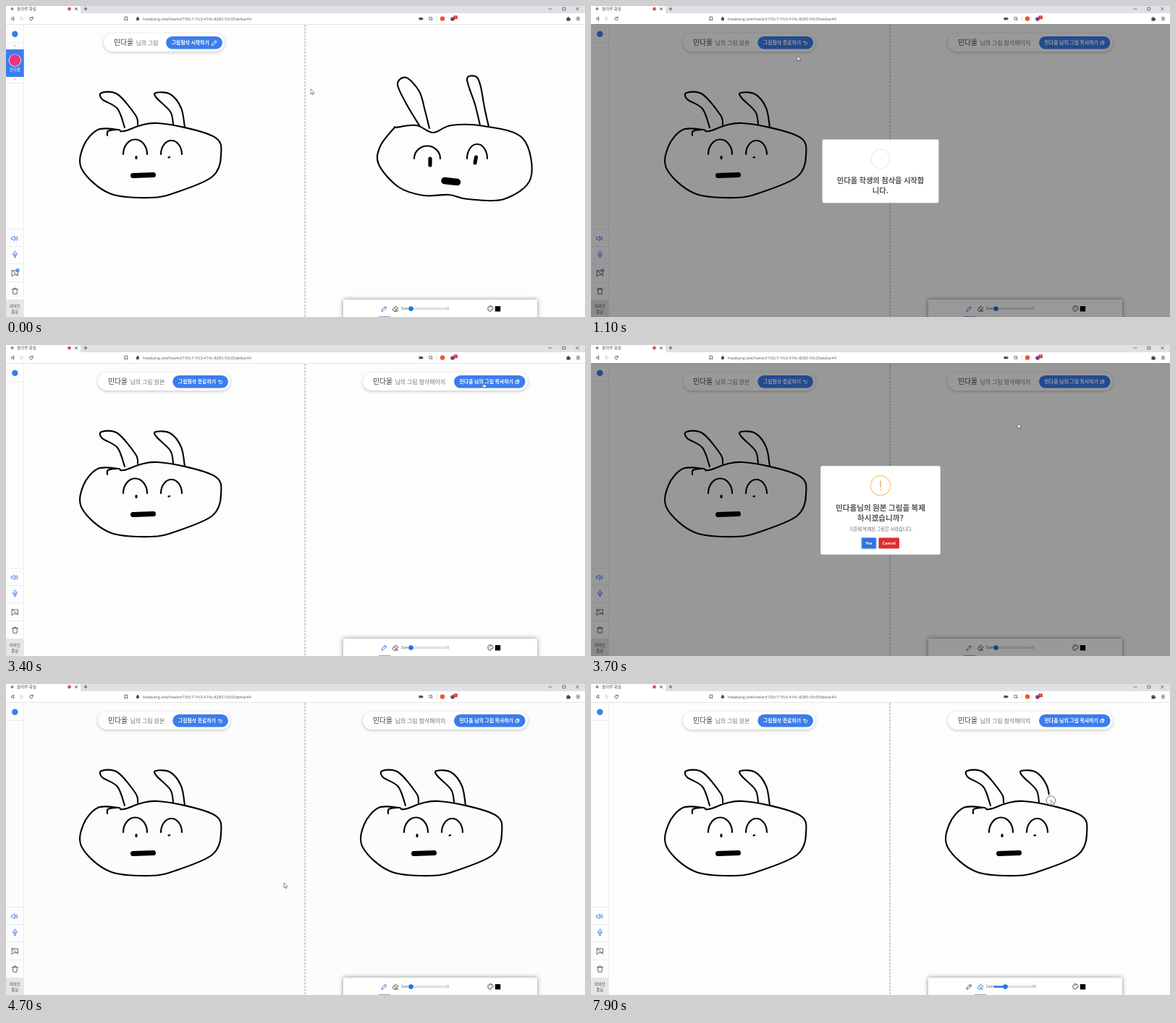
Recreate the animation shown at these times as an HTML page with a canvas. Size 800 px wide and 430 px high, loop 8000 ms.

```html
<!DOCTYPE html>
<html lang="ko">
<head>
<meta charset="utf-8">
<title>솔마루 화실</title>
<style>
html, body { margin: 0; width: 800px; height: 430px; overflow: hidden; background: #fefdfe; }
canvas { display: block; width: 800px; height: 430px; }
</style>
</head>
<body>
<canvas id="stage"></canvas>
<script>
const LOOP = 8000, W = 800, H = 430;
const BLUE = '#3b7ded', PAGE = '#fefdfe', INK = '#444';
const NAME = '민다올';
const KR = '"Noto Sans CJK KR", "Noto Sans CJK", "Noto Sans", sans-serif';
const LATIN = '"Open Sans", "Noto Sans", sans-serif';

const START = { open: 905, close: 2380, h: 91 };
const COPY = { open: 3530, close: 4552, h: 123.6 };
const ERASER_ON = 5500, DRAG = [5950, 6250], ERASE = 7200, RADIUS = 6.25;

const canvas = document.getElementById('stage');
const c = canvas.getContext('2d');
const dpr = window.devicePixelRatio || 1;
canvas.width = W * dpr;
canvas.height = H * dpr;

const clamp = v => Math.min(1, Math.max(0, v));
const span = (t, a, b) => clamp((t - a) / (b - a));
const mix = (a, b, u) => a + (b - a) * u;
const smooth = u => u * u * (3 - 2 * u);

// CSS "ease": cubic-bezier(.25, .1, .25, 1)
function ease(x) {
  const bez = (s, a, b) => 3 * s * (1 - s) * ((1 - s) * a + s * b) + s ** 3;
  let lo = 0, hi = 1;
  for (let i = 0; i < 16; i++) {
    const s = (lo + hi) / 2;
    if (bez(s, .25, .25) < x) lo = s; else hi = s;
  }
  return bez(lo, .1, 1);
}

// ---------- drawing helpers ----------
function rect(x, y, w, h, color) {
  c.fillStyle = color;
  c.fillRect(x, y, w, h);
}
function round(x, y, w, h, r, color) {
  c.fillStyle = color;
  c.beginPath();
  c.roundRect(x, y, w, h, r);
  c.fill();
}
function shadowed(x, y, w, h, r, blur, dy, alpha) {
  c.save();
  c.shadowColor = `rgba(0,0,0,${alpha})`;
  c.shadowBlur = blur * dpr;
  c.shadowOffsetY = dy * dpr;
  round(x, y, w, h, r, '#fff');
  c.restore();
}
function dot(x, y, r, color) {
  c.fillStyle = color;
  c.beginPath();
  c.arc(x, y, r, 0, 7);
  c.fill();
}
function ring(x, y, r, color, w) {
  c.strokeStyle = color;
  c.lineWidth = w;
  c.beginPath();
  c.arc(x, y, r, 0, 7);
  c.stroke();
}
// y is the visual middle of the line
function text(s, x, y, size, color, { weight = 400, align = 'left', font = KR } = {}) {
  c.font = `${weight} ${size}px ${font}`;
  c.textAlign = align;
  c.fillStyle = color;
  c.fillText(s, x, y + size * .36);
}
function icon(x, y, d, color = INK, w = .9, fill, k = 1) {
  c.save();
  c.translate(x, y);
  c.scale(k, k);
  const p = new Path2D(d);
  c.lineWidth = w;
  c.strokeStyle = color;
  c.lineCap = c.lineJoin = 'round';
  if (fill) { c.fillStyle = fill; c.fill(p); }
  c.stroke(p);
  c.restore();
}

const ICON = {
  pencil: 'M-3.4 3.4-2.7.9 1.5-3.2 3.2-1.5-1 2.7ZM.5-2.2 2.2-.5',
  eraser: 'M-3.8.8.6-3.5 3.9-.6-.2 3.4H-1.6ZM-1.6-1.3 1.8 1.6M-.2 3.4H3.6',
  undo: 'M-2.4-1.1H1A1.7 1.7 0 0 1 1 2.3H-1.2M-1-2.6-2.4-1.1-1 .4',
  copy: 'M-2.2-1H1.1V2.4H-2.2ZM-1-1V-2.3H2.4V1.2H1.1',
  speaker: 'M-4.2-1.4H-2.4L0-3.3V3.3L-2.4 1.4H-4.2ZM1.6-1.4Q2.6 0 1.6 1.4M3-2.8Q5 0 3 2.8',
  mic: 'M-1.4-2.6a1.4 1.4 0 0 1 2.8 0V0a1.4 1.4 0 0 1-2.8 0ZM-3-.6a3 3 0 0 0 6 0M0 2.5V4.2M-1.5 4.2H1.5',
  chat: 'M-4-3.4H4V2.4H-1.4L-4 4.2ZM-4.4-4 4.4 4',
  trash: 'M-4-2.6H4M-1.5-2.6V-4H1.5V-2.6M-3-2.6-2.6 4H2.6L3-2.6',
  palette: 'M0-3.8a3.8 3.8 0 0 0 0 7.6q1.2-.3.6-1.5-.3-1.3 1-1.3H3q1-.3.8-1.6A3.9 3.9 0 0 0 0-3.8ZM-2-.3v.1M-1-2v.1M1.2-2v.1',
  down: 'M-1.2-.5 0 .6 1.2-.5',
  arrow: 'M0 0V8.2L1.9 6.5 3.2 9.3 4.3 8.8 3.1 6.1H5.7Z',
  hand: 'M-.7 0Q0-.8.7 0V3L3.6 3.8Q4.2 4.2 3.9 5.4L3.2 8H-1L-3.2 4.8Q-2.8 3.8-1.8 4.6L-.7 5.4Z'
};

// ---------- doodles ----------
function ink(w = 2.1) {
  c.strokeStyle = '#000';
  c.lineWidth = w;
  c.lineCap = c.lineJoin = 'round';
  c.beginPath();
}
// spline through a few points given as "x,y x,y ..."
function pen(points, closed) {
  const p = points.split(' ').map(s => s.split(',').map(Number));
  const n = p.length;
  const at = i => closed ? p[(i + n) % n] : p[Math.min(n - 1, Math.max(0, i))];
  ink();
  c.moveTo(...p[0]);
  for (let i = 0; i < (closed ? n : n - 1); i++) {
    const [a, b, d, e] = [at(i - 1), at(i), at(i + 1), at(i + 2)];
    c.bezierCurveTo(b[0] + (d[0] - a[0]) / 6, b[1] + (d[1] - a[1]) / 6,
      d[0] - (e[0] - b[0]) / 6, d[1] - (e[1] - b[1]) / 6, ...d);
  }
  c.stroke();
}
function brow(x, y, rx, h) {
  ink();
  c.ellipse(x, y, rx, h, 0, Math.PI, 2 * Math.PI);
  c.stroke();
}
function blob(x0, y0, x1, y1, w) {
  ink(w);
  c.moveTo(x0, y0);
  c.lineTo(x1, y1);
  c.stroke();
}
function sketch(dx) {
  c.save();
  c.translate(dx, 0);
  pen('155,171 127,171 107,194 105,226 143,259 200,265 237,257 285,236 297,207 286,180 209,162 163,173', true);
  pen('140,179 141,173 153,171');
  pen('164,168 154,142 133,129 132,120 154,122 179,151 182,164');
  pen('231,163 227,146 208,127 207,120 227,122 242,141 247,168');
  brow(178.5, 205, 16.5, 20.5);
  brow(228.5, 205, 14.5, 19);
  blob(180, 208.5, 180, 210.5, 3);
  blob(224.5, 209.5, 226, 209, 2.3);
  blob(175.5, 234.5, 203.5, 233.5, 7);
  c.restore();
}
function attempt() {
  pen('536,169 517,194 515,219 542,250 577,262 612,261 638,267 688,267 725,238 714,183 660,166 615,165 590,175 567,165 539,168', true);
  pen('571,165 553,135 541,108 553,99 571,118 579,145 585,169');
  pen('655,165 648,136 637,101 650,98 656,112 661,140 667,167');
  brow(582, 211, 18, 17.5);
  brow(651, 211, 14, 20);
  blob(586, 211, 586, 220, 5.2);
  blob(649.5, 209, 648, 217, 5);
  blob(606, 241.5, 623.5, 243.5, 9.5);
}

// ---------- pointer: [from, to, x, y], resting between moves ----------
const MOVES = [
  [150, 800, 266, 52], [920, 1100, 285, 69],
  [1500, 2500, 652, 74], [2700, 3000, 660, 52],
  [3500, 4110, 384, 275], [4750, 5350, 538, 418],
  [5650, 5900, 559, 418], [...DRAG, 571, 417],
  [6400, 6850, 664, 115], [6850, 7250, 639, 156], [7250, 7900, 635.5, 161]
];
function pointer(t) {
  let x = 421, y = 115;
  for (const [from, to, nx, ny] of MOVES) {
    const u = smooth(span(t, from, to));
    x = mix(x, nx, u);
    y = mix(y, ny, u);
  }
  return [x, y];
}
function clickable(t, x, y) {
  const over = (bx, by, w, h) => x > bx && x < bx + w && y > by && y < by + h;
  const asking = t > COPY.open && t < COPY.close;
  return over(221, 42, 86, 18) || over(619, 42, 98, 18) ||
    over(515, 410, 100, 20) || asking && over(374, 267, 20, 15);
}
function drawPointer(t) {
  const [x, y] = pointer(t);
  if (t > ERASER_ON && y < 400) ring(x, y, RADIUS, '#555', .8);
  icon(x, y, clickable(t, x, y) ? ICON.hand : ICON.arrow, '#444', .7, '#fff', .85);
}

// ---------- page parts ----------
function browser() {
  rect(0, 0, W, 10, '#dee1e6');
  round(0, 0, 103, 11, [0, 3, 0, 0], '#fff');
  rect(0, 10, W, 15, '#fff');
  rect(0, 25, W, .7, '#dcdcdf');
  dot(8.5, 4, 2, '#8b8b8b');
  text('솔마루 화실', 15, 4, 5.6, '#555');
  ring(87.5, 4, 2.5, '#f0a09a', .7);
  dot(87.5, 4, 2, '#e03b30');
  icon(97, 4, 'M-1.5-1.5 1.5 1.5M1.5-1.5-1.5 1.5');
  icon(110, 4, 'M-2 0H2M0-2V2');
  icon(752, 4, 'M-2 0H2', INK, .7);
  icon(771, 4, 'M-1.8-1.8H1.8V1.8H-1.8Z', INK, .7);
  icon(789.5, 4, 'M-2-2 2 2M2-2-2 2', INK, .7);
  icon(9, 17.5, 'M1.4-2.2-2 0 1.4 2.2Z', INK, .8);
  icon(22, 17.5, 'M-1.4-2.2 2 0-1.4 2.2Z', '#c4c4c4', .8);
  icon(35, 17.5, 'M1.9-1.2A2.2 2.2 0 1 0 2.2.6M2.1-2.5V-.9H.5', INK, .8);
  icon(166, 17.5, 'M-1.7-2.4H1.7V2.4L0 1-1.7 2.4Z', INK, .8);
  icon(182, 17.5, 'M-1.5-.4H1.5V2H-1.5ZM-.9-.4V-1.4a.9.9 0 0 1 1.8 0V-.4', INK, .7, INK);
  text('hwabang.site/live/ecf155c7-1fc3-414c-8285-53c05ab6ac44', 189, 17.6, 5.55, '#5a5a5e', { font: LATIN });
  icon(573.5, 17.6, 'M-2.4-1.4H1V1.4H-2.4ZM1 0 2.5-1.2V1.2Z', INK, .6, INK);
  icon(587, 17.5, 'M-1.8-2H1.6V1.6H-1.8ZM0 0 2.2 2', '#666', .8);
  rect(595, 13.5, .6, 8, '#ccc');
  dot(603, 17.5, 3.2, '#f0562d');
  dot(617, 18, 2.8, '#7d3a86');
  round(618.5, 13.3, 5.4, 5, 1, '#d93a32');
  text('1', 621.2, 15.8, 4, '#fff', { align: 'center', font: LATIN });
  icon(777, 17.7, 'M-2-1.3H-.7Q-.8-2.8 0-2.8T.7-1.3H2V0Q3.2 0 3.2.8T2 1.4V2.5H-2Z', INK, .5, INK);
  icon(790.5, 17.5, 'M-2-1.8H2M-2 0H2M-2 1.8H2', INK, .8);
}

function sidebar(t, reviewing) {
  const line = y => rect(0, y, 24.5, .7, '#e3e4e8');
  const label = (s, y, color) => text(s, 12.3, y, 5.5, color, { align: 'center' });
  rect(24.3, 26, .7, 404, '#e3e4e8');
  dot(12.3, 38.8, 4.2, BLUE);
  line(50);
  if (!reviewing) {
    icon(12, 55, ICON.down, '#777', .7);
    rect(0, 60, 24.7, 38, BLUE);
    dot(12.3, 75, 8.6, '#fff');
    dot(12.3, 75, 7.9, '#f0327a');
    label(NAME, 88.3, '#fff');
    icon(12, 101.8, ICON.down, '#777', .7);
    line(106);
  }
  [308, 332, 356, 381].forEach(line);
  icon(12, 321.3, ICON.speaker, BLUE);
  icon(12.4, 343, ICON.mic, BLUE);
  icon(12.4, 369.3, ICON.chat, '#555');
  icon(12.4, 394.2, ICON.trash, '#555');
  c.globalAlpha = .75 * clamp(1 - (t % 1000) / 400);
  dot(16, 365.5, 2.7, BLUE);
  c.globalAlpha = 1;
  rect(0, 406, 24.5, 24, '#e6e6e8');
  label('라이브', 414.8, INK);
  label('종료', 422.6, INK);
}

function header(x, w, label, bx, bw, action, glyph) {
  shadowed(x, 38, w, 25, 12.5, 4, 1.2, .22);
  text(NAME, x + 14, 50.2, 9.8, '#3d3d41', { weight: 500 });
  text(label, x + 44.5, 50.8, 8, '#77777c');
  round(bx, 42, bw, 17.5, 8.75, BLUE);
  text(action, bx + 7.5, 50.7, 6.9, '#fff', { weight: 700 });
  icon(bx + bw - 11, 50.8, glyph, '#fff');
}

function toolbar(t) {
  shadowed(466, 406, 268, 30, 1, 6, 0, .45);
  const erasing = t >= ERASER_ON;
  icon(522.5, 418.5, ICON.pencil, erasing ? '#555' : BLUE, 1);
  icon(538, 418.5, ICON.eraser, erasing ? BLUE : INK, 1);
  rect(erasing ? 530 : 515, 429.2, 16, .8, '#888');
  text('Size', 545.8, 418.6, 5.2, '#555', { font: LATIN });
  const size = Math.round(mix(5, 30, smooth(span(t, ...DRAG))));
  const knob = 556.9 + size * .52;
  round(556, 417.2, 53, 2.8, 1.4, '#b9b9bd');
  round(556.6, 417.8, 51.8, 1.6, .8, '#efeff1');
  round(556, 417.2, knob - 556, 2.8, 1.4, BLUE);
  dot(knob, 418.6, 3.3, '#1f74e8');
  text(size, 609.2, 418.6, 5, '#666', { font: LATIN });
  icon(669.5, 418.5, ICON.palette);
  rect(675.8, 415, 7.4, 7.4, '#000');
}

function erase(t) {
  for (let s = ERASE; s <= t; s += 20) dot(...pointer(s), RADIUS, PAGE);
}

function divider() {
  c.strokeStyle = '#bcbcc0';
  c.lineWidth = 1.5;
  c.lineCap = 'butt';
  c.setLineDash([3, 1.6]);
  c.beginPath();
  c.moveTo(413.2, 26);
  c.lineTo(413.2, H);
  c.stroke();
  c.setLineDash([]);
}

// ---------- dialogs ----------
function popScale(ms) {
  const p = clamp(ms / 300);
  if (p < .45) return mix(.7, 1.05, ease(p / .45));
  if (p < .8) return mix(1.05, .95, ease((p - .45) / .35));
  return mix(.95, 1, ease((p - .8) / .2));
}
function dialog(t, { open, close, h }, body) {
  const leave = span(t, close, close + 150);
  if (t < open || leave === 1) return;
  const dim = .4 * clamp((t - open) / 100) * (1 - leave);
  rect(0, 25, W, H - 25, `rgba(0,0,0,${dim})`);
  const k = leave > 0 ? mix(1, .5, leave) : popScale(t - open);
  c.save();
  c.globalAlpha = 1 - leave;
  c.translate(400, 228.4);
  c.scale(k, k);
  round(-83.5, -h / 2, 167, h, 2.2, '#fff');
  body(t - open);
  c.restore();
}
const title = (s, y) => text(s, 0, y, 10.7, '#545458', { weight: 700, align: 'center' });

function startBody(ms) {
  ring(0, -17.6, 13.6, '#e3eedc', 1.1);
  const down = span(ms, 400, 520), up = span(ms, 520, 700);
  if (down > 0) {
    c.strokeStyle = '#a5dc86';
    c.lineWidth = 1.5;
    c.lineCap = 'round';
    c.beginPath();
    c.moveTo(-6.5, -17);
    c.lineTo(-6.5 + 4.5 * down, -17 + 4.5 * down);
    if (up > 0) c.lineTo(-2 + 9 * up, -12.5 - 9 * up);
    c.stroke();
  }
  title(NAME + ' 학생의 첨삭을 시작합', 13.3);
  title('니다.', 27.8);
}
function copyBody() {
  const amber = '#f4c583';
  const white = { weight: 700, align: 'center', font: LATIN };
  ring(0, -34.3, 13.7, amber, 1.2);
  icon(0, -34.3, 'M0-6V2M0 6V6.1', amber, 2);
  title(NAME + '님의 원본 그림을 복제', -3.2);
  title('하시겠습니까?', 11.3);
  text('기존에 복제된 그림은 사라집니다.', .5, 26.8, 6.4, '#6a6a6e', { align: 'center' });
  round(-27.3, 37.6, 22.2, 17, 2, '#a9cdf5');
  round(-26, 38.8, 19.6, 14.6, 1.3, '#2f74de');
  round(-2.6, 38.4, 28.8, 15.2, 1.3, '#dd2f2f');
  text('Yes', -16.2, 46.2, 5.6, '#fff', white);
  text('Cancel', 11.8, 46.2, 5.6, '#fff', white);
}

// ---------- frame ----------
function draw(t) {
  const reviewing = t >= START.open;
  c.setTransform(dpr, 0, 0, dpr, 0, 0);
  rect(0, 0, W, H, PAGE);
  sketch(0);
  if (!reviewing) attempt();
  if (t >= COPY.close) {
    sketch(388);
    erase(t);
  }
  divider();
  if (reviewing) {
    header(127, 183, '님의 그림 원본', 230.3, 76.7, '그림첨삭 종료하기', ICON.undo);
    header(493, 228, '님의 그림 첨삭페이지', 619, 98.5, NAME + ' 님의 그림 복사하기', ICON.copy);
  } else {
    header(135, 167, '님의 그림', 221, 78, '그림첨삭 시작하기', ICON.pencil);
  }
  sidebar(t, reviewing);
  toolbar(t);
  browser();
  dialog(t, START, startBody);
  dialog(t, COPY, copyBody);
  drawPointer(t);
}

const start = performance.now();
function tick(now) {
  draw(Math.max(0, now - start) % LOOP);
  requestAnimationFrame(tick);
}
draw(0);
requestAnimationFrame(tick);
</script>
</body>
</html>
```
